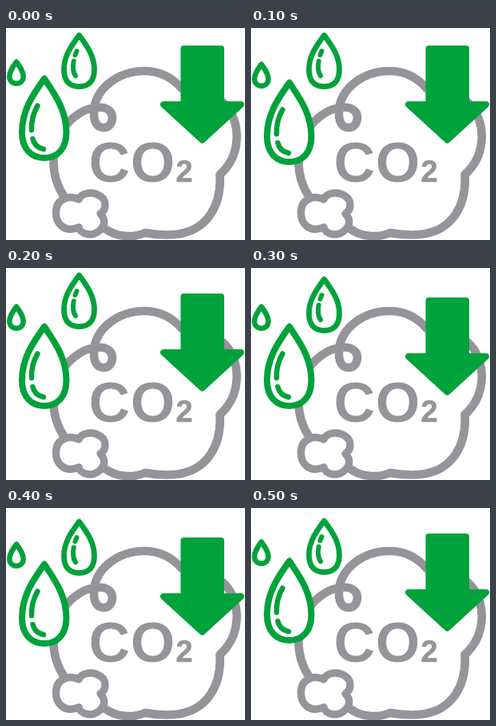
An HTML page for the animation above (0.6 s loop, 299x266 px).

```html
<!DOCTYPE html>
<html lang="en">
<head>
<meta charset="utf-8">
<title>CO2 reduction</title>
<style>
  html, body { margin: 0; width: 100%; height: 100%; overflow: hidden; background: #fff; }
  svg { display: block; width: 100vw; height: 100vh; }
  .line { fill: #fff; stroke-linecap: round; stroke-linejoin: round; }
  .gray { stroke: #949499; }
  .green { stroke: #00a23b; }
  .open { fill: none; }
  text { font-family: "Liberation Sans", Arial, sans-serif; font-weight: 700; fill: #949499; }
</style>
</head>
<body>
<svg viewBox="0 0 299 266">
  <path class="line gray" stroke-width="10.6" d="M73 212C53 182 56 143 77 119.500C88 108 101 100 115 99.500
    C127 99 133.500 105 133 113C132.500 121 128 125 122 125C114 125 110 118 110 107
    C110 75 142 54 173 54C191 54 207 61 220 76C243 76 266 84 279 102
    C293 124 294 160 267.500 184C270 222 252 253 216 258.500C200 260.500 185 259 174 257
    C158 264 138 262 124 252"/>
  <path class="line gray" stroke-width="9.4" d="M91 215C79 209 63 214 62.500 231C62 248 76 257 91 250
    C94 260 109 262 117 254C125 247 124 239 118 233C126 228 126 216 118 211C108 204 94 207 91 215Z"/>
  <text font-size="71" y="193"><tspan x="103.700">C</tspan><tspan x="156">O</tspan></text>
  <text class="gray" stroke-width="0.6" font-size="38" x="212.500" y="193">2</text>

  <g id="small" class="line green" stroke-width="6.5">
    <path d="M13 42.500C9 48 4.300 54 4.300 61C4.300 66 8 69.700 13 69.700C18 69.700 21.700 66 21.700 61C21.700 54 17 48 13 42.500Z"/>
  </g>
  <g id="medium" class="line green" stroke-width="6.800">
    <path d="M91.500 9C83 21 72.500 34 72.500 52C72.500 66 79 73.500 91.500 73.500C104 73.500 110.500 66 110.500 52C110.500 34 100 21 91.500 9Z"/>
    <path class="open" stroke-width="6" d="M88.500 29L86.500 34M84.700 41.500C83.500 48 83.500 55 87 60"/>
  </g>
  <g id="large" class="line green" stroke-width="8">
    <path d="M48 63.500C35 82 20 102 20 131C20 152 32 163 48 163C64 163 75.500 152 75.500 131C75.500 102 60 82 48 63.500Z"/>
    <path class="open" stroke-width="6.500" d="M39.500 97.500C34 107 31.500 117 32 128M33.500 139C35 146 40 150.500 47 152"/>
  </g>
  <path id="arrow" class="green" fill="#00a23b" stroke-width="8" stroke-linejoin="round"
    d="M222.500 26H269V96H294L245.500 140.500L197 96H222.500Z"/>
</svg>
<script>
  const STEP = 100;
  // Vertical offset of each part, held for one step
  const offsets = {
    small: [0, 3, 6, 6, 3, 0],
    medium: [0, 0, 0, 5, 8, 7],
    large: [0, 5, 10, 10, 7, 3],
    arrow: [0, 0, 10, 15, 15, 10]
  };
  const parts = Object.entries(offsets).map(([id, ys]) => [document.getElementById(id), ys]);

  function draw(time) {
    const step = Math.floor(time / STEP) % 6;
    for (const [part, ys] of parts) part.setAttribute("transform", `translate(0 ${ys[step]})`);
  }

  const start = performance.now();
  function tick() {
    draw(performance.now() - start);
    requestAnimationFrame(tick);
  }
  draw(0);
  requestAnimationFrame(tick);
</script>
</body>
</html>
```
